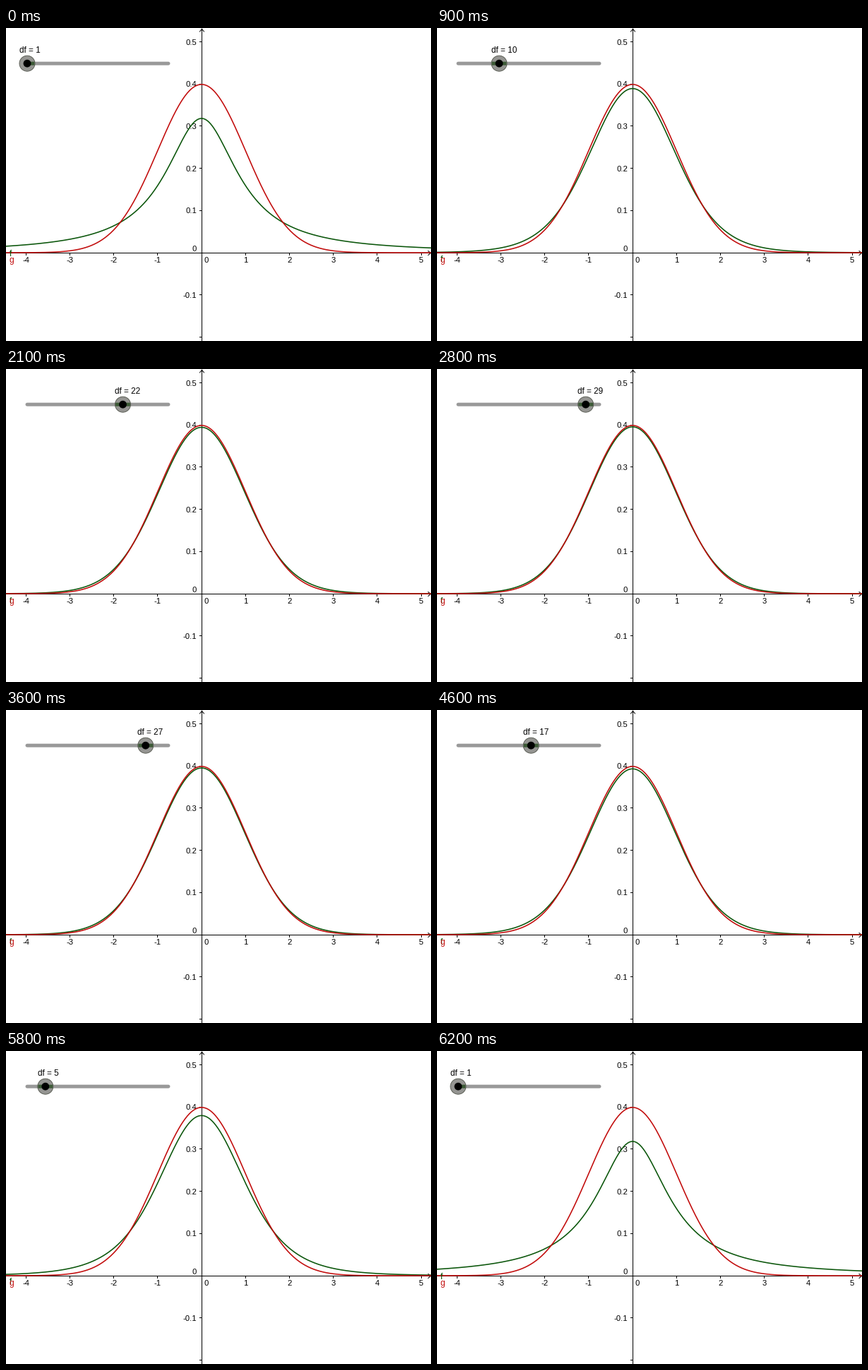
Write a matplotlib script that moves like this. It is 602x443 px and loops after 6.3 s.

```python
import math

import matplotlib.pyplot as plt
import numpy as np
from matplotlib.animation import FuncAnimation
from matplotlib.patches import Circle

W, H, DPI = 602, 443, 64
PX = 72 / DPI                      # points per pixel
X0, Y0 = 277.0, 318.0              # origin of the plot
UX, UY = 62.2, 597.0               # pixels per unit
FRAMES, INTERVAL = 63, 100
SLIDER = (30, 230)
SLIDER_Y = 50.2
MAX_DF = 32
HALO = 11
GREEN, RED = "#0b560b", "#c20c0c"

plt.rcParams["font.family"] = "Liberation Sans"
fig = plt.figure(figsize=(W / DPI, H / DPI), dpi=DPI, facecolor="white")
ax = fig.add_axes([0, 0, 1, 1])
ax.set_xlim(0, W)
ax.set_ylim(H, 0)
ax.axis("off")


def crisp(v):
    """Centre of the pixel that holds v."""
    return math.floor(v) + 0.5


def line(xs, ys, color="black", width=1.0, z=1, **kw):
    return ax.plot(xs, ys, color=color, lw=width * PX, zorder=z, snap=False,
                   **kw)[0]


def label(x, y, text, size=11.2, ha="center", color="black", z=1):
    return ax.text(x, y, text, fontsize=size * PX, ha=ha, va="baseline",
                   color=color, zorder=z)


def normal_pdf(x):
    return np.exp(-x * x / 2) / math.sqrt(2 * math.pi)


def student_pdf(x, df):
    log_c = math.lgamma((df + 1) / 2) - math.lgamma(df / 2)
    c = math.exp(log_c) / math.sqrt(df * math.pi)
    return c * (1 + x * x / df) ** (-(df + 1) / 2)


def draw_axes():
    ox, oy = crisp(X0), crisp(Y0)
    line([0, W], [oy, oy])
    line([ox, ox], [1, H])
    line([W - 4, W - 0.5, W - 4], [oy - 3, oy, oy + 3])
    line([ox - 3, ox, ox + 3], [5, 1.5, 5])
    for i in range(-4, 6):
        x = X0 + i * UX
        if i:
            line([crisp(x)] * 2, [oy, oy + 3.5], solid_capstyle="butt")
            label(x, 332, str(i))
    label(284, 332, "0")
    for i in range(-2, 6):
        y = Y0 - i * UY / 10
        if i:
            line([ox - 3.5, ox], [crisp(y)] * 2, solid_capstyle="butt")
        if i and i > -2:
            label(270, y + 4, f"{i / 10:.1f}", ha="right")
    label(270, 316.5, "0", ha="right")


draw_axes()
px = np.linspace(-2, W + 2, 605)
xs = (px - X0) / UX
left = -X0 / UX

t_curve = line(px, px, GREEN, 1.6, 2)
line(px, Y0 - UY * normal_pdf(xs), RED, 1.6, 3)
f_label = label(4.4, 332, "f", 12, "left", GREEN, 4)
label(4.4, 331.6, "g", 12, "left", RED, 5)

line(SLIDER, [SLIDER_Y] * 2, "#999999", 5, 6, solid_capstyle="round")
halo = Circle((0, SLIDER_Y), HALO, fc="#959592", ec="#55584f", lw=0.9 * PX,
              zorder=7)
track = line([0, 0], [SLIDER_Y] * 2, "#3c5a36", 5, 8, solid_capstyle="butt")
dot = Circle((0, SLIDER_Y), 5.4, fc="black", ec="none", zorder=9)
ax.add_patch(halo)
ax.add_patch(dot)
df_label = label(0, 35, "", 11.8, "left", z=9)


def update(i):
    df = min(i + 1, FRAMES - i)
    lo, hi = SLIDER
    x = lo + (hi - lo) * (df - 1) / (MAX_DF - 1)
    t_curve.set_ydata(Y0 - UY * student_pdf(xs, df))
    f_label.set_y(332 - UY * student_pdf(left, df))
    halo.center = dot.center = (x, SLIDER_Y)
    reach = HALO - 0.6
    track.set_xdata([max(lo, x - reach), min(hi, x + reach)])
    df_label.set_x(x - 11.3)
    df_label.set_text(f"df = {df}")
    return t_curve, f_label, halo, track, dot, df_label


anim = FuncAnimation(fig, update, frames=FRAMES, interval=INTERVAL,
                     repeat=True, repeat_delay=0, blit=False)
plt.show()
```
